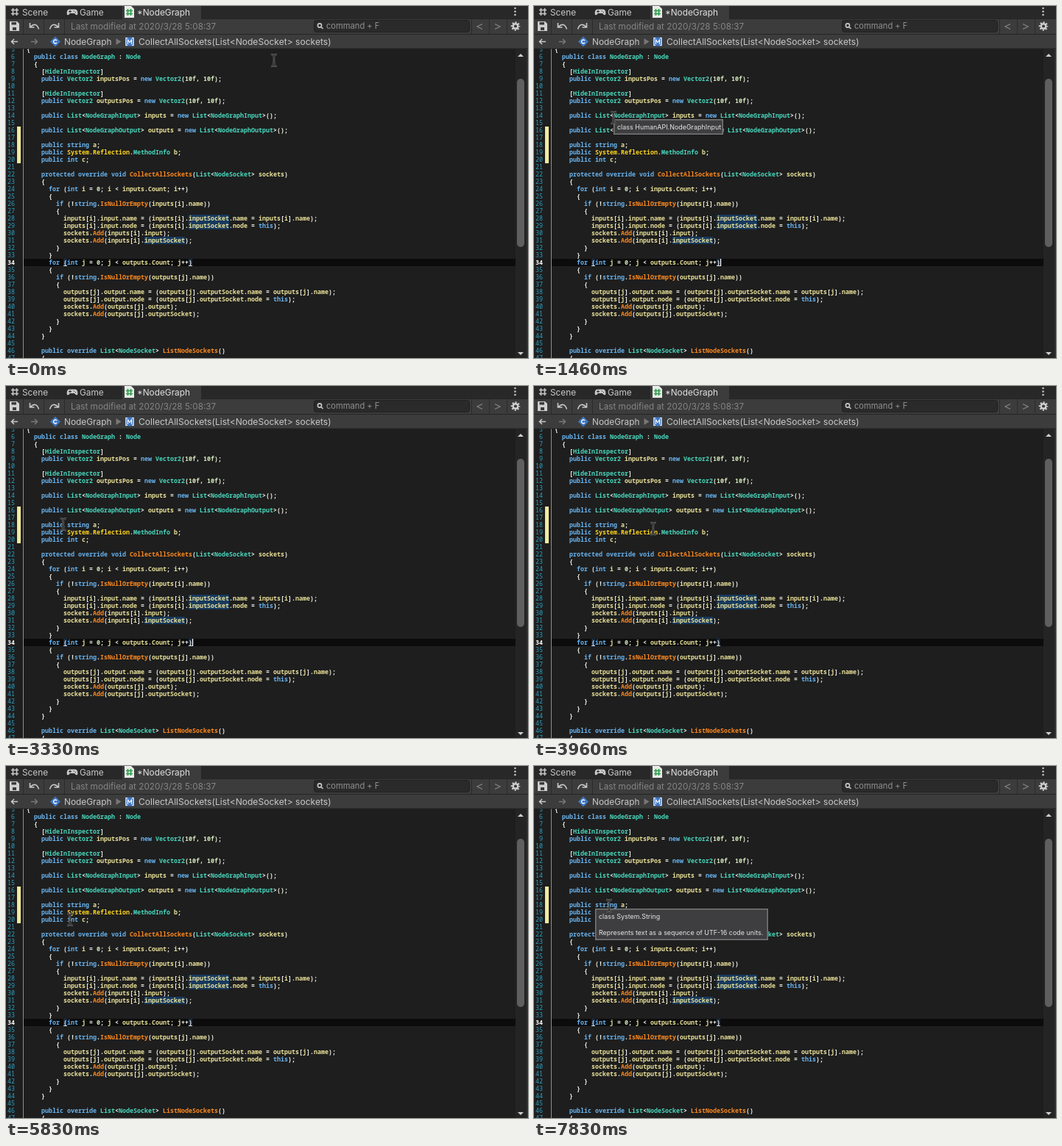
These frames come from a looping animation (709x479 px, 8000 ms). An HTML page:

```html
<!DOCTYPE html>
<html lang="en">
<head>
<meta charset="utf-8">
<title>Script editor</title>
<style>
  html, body { margin: 0; width: 100%; height: 100%; overflow: hidden; background: #1e1e1e; }
  svg { display: block; width: 709px; height: 479px; }
  text { white-space: pre; }
  .code { font: 600 8.333px "Noto Sans Mono", monospace; fill: #f2f2ea; }
  .num { fill: #2ba0c4; text-anchor: end; font-weight: 500; }
  .cur { fill: #fff; font-weight: 700; }
  .key { fill: #68b4f0; }
  .type { fill: #4ad8be; }
  .method { fill: #ff8a1f; font-weight: 700; }
  .space { fill: #ffd51f; font-weight: 700; }
  .name { fill: #ebe29a; }
  .lit { fill: #d4e6bc; }
  .ui { font: 11.85px Inter, sans-serif; fill: #c8c8c8; }
  .dim { fill: #858585; }
  .tip { font: 8.95px Inter, sans-serif; fill: #e6e6e6; }
  .icon { fill: none; stroke: #c8c8c8; stroke-width: 1.6; }
</style>
</head>
<body>
<svg viewBox="0 0 709 479">
  <rect width="709" height="479" fill="#1e1e1e"/>
  <g id="editor"></g>

  <!-- scrollbar -->
  <rect x="692" y="58" width="15" height="421" fill="#242424"/>
  <rect x="707" y="58" width="2" height="421" fill="#303030"/>
  <rect x="694" y="99" width="10" height="229" rx="5" fill="#5f5f5f"/>
  <path d="M695 69l4-4 4 4zM695 471l4 4 4-4z" fill="#d0d0d0"/>

  <!-- tabs and toolbars -->
  <rect width="709" height="17" fill="#282828"/>
  <rect x="158" width="107" height="18" fill="#3c3c3c"/>
  <rect y="17" width="709" height="41" fill="#3c3c3c"/>
  <path d="M0 17.500H158M265 17.500H709M0 38.500H709M0 58H709" stroke="#252525"/>
  <path d="M23.500 18V38M51.500 18V38M79.500 18V38M632.500 18V38M656.500 18V38M680.500 18V38" stroke="#2b2b2b"/>

  <path class="icon" d="M9.500 3V13M14.500 3V13M7 5.500H17M7 10.500H17" stroke-width="1.4"/>
  <path d="M86 4.500H94C97 4.500 98 9 97 12Q95 13 93 10H87Q85 13 83 12C82 9 83 4.500 86 4.500Z" fill="#c8c8c8"/>
  <path d="M85 7.500H89M87 5.500V9.500M92 7H93M94 8.500H95" stroke="#282828"/>
  <path d="M161 0H170L174 4V16H161Z" fill="#e6eee6"/>
  <path d="M165.500 4V13M169.500 4V13M163 6.500H172M163 10.500H172" stroke="#2d9a4c" stroke-width="1.6"/>
  <g class="ui">
    <text x="22" y="13">Scene</text><text x="100" y="13">Game</text>
    <text x="178" y="13" fill="#e0e0e0">*NodeGraph</text>
    <text x="88" y="32" class="dim" style="font-size:11.75px">Last modified at 2020/3/28 5:08:37</text>
    <text x="79" y="53">NodeGraph</text>
    <text x="180" y="53" style="font-size:12.08px">CollectAllSockets(List&lt;NodeSocket&gt; sockets)</text>
  </g>
  <g fill="#c8c8c8"><circle cx="691.500" cy="3" r="1.300"/><circle cx="691.500" cy="7.500" r="1.300"/><circle cx="691.500" cy="12" r="1.300"/></g>

  <path d="M5 21H15L18 24V34H5Z" fill="#d0d0d0"/>
  <path d="M7.500 22H14V25.500H7.500ZM9 29H14V33H9Z" fill="#3c3c3c"/>
  <path class="icon" d="M32.500 23V29H38.500M33 28.500Q41 21 44.500 31.500"/>
  <path class="icon" d="M71.500 23V29H65.500M71 28.500Q63 21 59.500 31.500"/>
  <rect x="418.500" y="19.500" width="211" height="16" rx="3" fill="#2a2a2a" stroke="#202020"/>
  <circle class="icon" cx="426" cy="26.500" r="2.600" stroke-width="1.3"/><path class="icon" d="M428 28.500L430.500 31"/>
  <text class="ui" x="435" y="31" style="font-size:11.15px" fill-opacity=".65">command + F</text>
  <path d="M647 24.500L640 28L647 31.500M664 24.500L671 28L664 31.500" fill="none" stroke="#858585" stroke-width="1.2"/>
  <circle cx="692" cy="27.500" r="5" fill="none" stroke="#d0d0d0" stroke-width="2.600" stroke-dasharray="1.96" stroke-dashoffset="1"/>
  <circle cx="692" cy="27.500" r="3.300" fill="none" stroke="#d0d0d0" stroke-width="2.400"/>

  <path class="icon" d="M11 45L7.500 48.500L11 52M7.500 48.500H16" stroke-width="1.2"/>
  <path class="icon" d="M39 45L42.500 48.500L39 52M42.500 48.500H34" stroke-width="1.2" style="stroke:#777"/>
  <path d="M67 41.500L74 48.500L67 55.500L60 48.500Z" fill="#3f78c4"/>
  <path d="M69 47A2.500 2.500 0 1 0 69 50" fill="none" stroke="#fff" stroke-width="1.3"/>
  <path d="M149.500 44L156.500 48.500L149.500 53Z" fill="#777"/>
  <rect x="162" y="42.500" width="12" height="12" fill="#3f78c4"/>
  <path d="M165 43.500H163V53.500H165M171 43.500H173V53.500H171M165.500 52V46L168 49.500L170.500 46V52" fill="none" stroke="#fff" stroke-width="1.1"/>

  <rect id="caret" x="253" y="344" width="1.200" height="10" fill="#fff"/>
  <g id="tips"></g>
  <g id="pointer" fill="none">
    <path d="M-4 -7Q0 -7 0 -4.500Q0 -7 4 -7M0 -5V7M-4 9Q0 9 0 6.500Q0 9 4 9M-2 4H2" stroke="#6e6e6e" stroke-width="2.500"/>
    <path d="M-4 -7Q0 -7 0 -4.500Q0 -7 4 -7M0 -5V7M-4 9Q0 9 0 6.500Q0 9 4 9M-2 4H2" stroke="#1c1c1c" stroke-width=".9"/>
  </g>
</svg>
<script>
const LOOP = 8000, LEFT = 28, CHAR = 5, FIRST_LINE = 5;
const $ = id => document.getElementById(id);

const source = `{
  public class NodeGraph : Node
  {
    [HideInInspector]
    public Vector2 inputsPos = new Vector2(10f, 10f);

    [HideInInspector]
    public Vector2 outputsPos = new Vector2(10f, 10f);

    public List<NodeGraphInput> inputs = new List<NodeGraphInput>();

    public List<NodeGraphOutput> outputs = new List<NodeGraphOutput>();

    public string a;
    public System.Reflection.MethodInfo b;
    public int c;

    protected override void CollectAllSockets(List<NodeSocket> sockets)
    {
      for (int i = 0; i < inputs.Count; i++)
      {
        if (!string.IsNullOrEmpty(inputs[i].name))
        {
          inputs[i].input.name = (inputs[i].inputSocket.name = inputs[i].name);
          inputs[i].input.node = (inputs[i].inputSocket.node = this);
          sockets.Add(inputs[i].input);
          sockets.Add(inputs[i].inputSocket);
        }
      }
      for (int j = 0; j < outputs.Count; j++)
      {
        if (!string.IsNullOrEmpty(outputs[j].name))
        {
          outputs[j].output.name = (outputs[j].outputSocket.name = outputs[j].name);
          outputs[j].output.node = (outputs[j].outputSocket.node = this);
          sockets.Add(outputs[j].output);
          sockets.Add(outputs[j].outputSocket);
        }
      }
    }

    public override List<NodeSocket> ListNodeSockets()
    {`.split("\n");

const kinds = [
  ["key", /^(public|protected|override|class|new|void|string|int|for|if|this)$/],
  ["space", /^(System|Reflection)$/],
  ["method", /^(CollectAllSockets|ListNodeSockets|IsNullOrEmpty|Add)$/],
  ["type", /^(Node\w*|List|Vector2|MethodInfo|HideInInspector)$/],
  ["lit", /^\d/],
  ["name", /^\w/],
];
const kindOf = word => (kinds.find(([, test]) => test.test(word)) || [""])[0];

function add(parent, tag, attrs, text = "") {
  const el = document.createElementNS("http://www.w3.org/2000/svg", tag);
  for (const key in attrs) el.setAttribute(key, attrs[key]);
  el.textContent = text;
  return parent.appendChild(el);
}
const box = (parent, x, y, width, height, fill) =>
  add(parent, "rect", { x, y, width, height, fill });

const editor = $("editor");
box(editor, 24, 344, 668, 10, "#0c0c0c");
box(editor, 15, 164, 5, 50, "#f0eb9c");
box(editor, 23, 58, 1, 421, "#8c8c8c");
for (const x of [78, 248]) {
  box(editor, x, 344, 5, 10, "#142c46");
  box(editor, x, 353, 5, 1, "#c8dcec");
}
source.forEach((line, i) => {
  const number = FIRST_LINE + i, y = 12 + 10 * number;
  add(editor, "text", { x: 12, y, class: "code num" + (number === 34 ? " cur" : "") }, number);
  for (const { 0: word, index } of line.matchAll(/\w+|[^\s\w]+/g)) {
    const x = LEFT + CHAR * index;
    if (word === "inputSocket") box(editor, x, y - 8, 55, 10, "#173a5e");
    // the dot between two namespace words shares their colour
    const kind = word === "." && /System|Reflection/.test(line) ? "space" : kindOf(word);
    add(editor, "text", { x, y, class: "code " + kind }, word);
  }
});

// show, hide, column, line, width, text lines
const tips = [
  [1300, 1860, 16, 14, 149, ["class HumanAPI.NodeGraphInput"]],
  [2160, 3060, 11, 16, 561, ["class Generic.List<NodeGraphOutput>",
    "Represents a strongly typed list of objects that can be accessed by index. Provides methods to search, sort, and manipulate lists."]],
  [4460, 5300, 29, 19, 346, ["class Reflection.MethodInfo",
    "Discovers the attributes of a method and provides access to method metadata."]],
  [6000, 6860, 11, 20, 158, ["struct System.Int32", "Represents a 32-bit signed integer."]],
  [7300, LOOP, 11, 18, 235, ["class System.String",
    "Represents text as a sequence of UTF-16 code units."]],
].map(([show, hide, column, line, width, lines]) => {
  const x = LEFT + CHAR * column, y = 14 + 10 * line;
  const el = add($("tips"), "g", {});
  const height = lines.length > 1 ? 43 : 21;
  box(el, x, y, width, height, "#787878");
  box(el, x + 1.5, y + 1.5, width - 3, height - 3, "#3e3e40");
  lines.forEach((text, i) => add(el, "text", { x: x + 5, y: y + 14 + 22 * i, class: "tip" }, text));
  return { el, show, hide };
});

// time, x, y
const path = [
  [0, 364, 73], [30, 363, 73], [200, 335, 88], [600, 226, 138], [830, 188, 149], [900, 187, 149],
  [1200, 120, 149], [1460, 108, 151], [1700, 101, 156], [1830, 101, 156], [2000, 95, 169],
  [3040, 95, 169], [3300, 75, 186], [3500, 92, 194], [3860, 162, 193], [3960, 162, 193],
  [4040, 159, 193], [4290, 194, 196], [5270, 194, 196], [5480, 135, 203], [5830, 87, 208],
  [6640, 87, 208], [6800, 102, 209], [6860, 103, 209], [7130, 102, 189], [LOOP, 102, 189],
];
function pointerAt(t) {
  const i = path.findIndex(p => p[0] > t);
  const [t0, x0, y0] = path[i - 1], [t1, x1, y1] = path[i];
  const k = (t - t0) / (t1 - t0);
  return [x0 + (x1 - x0) * k, y0 + (y1 - y0) * k];
}

const start = performance.now();
function draw() {
  const t = (performance.now() - start) % LOOP;
  $("pointer").setAttribute("transform", `translate(${pointerAt(t)})`);
  $("caret").style.opacity = (t + 670) % 1000 < 500 ? 1 : 0;
  for (const { el, show, hide } of tips) el.style.display = t >= show && t < hide ? "" : "none";
  requestAnimationFrame(draw);
}
draw();
</script>
</body>
</html>
```
